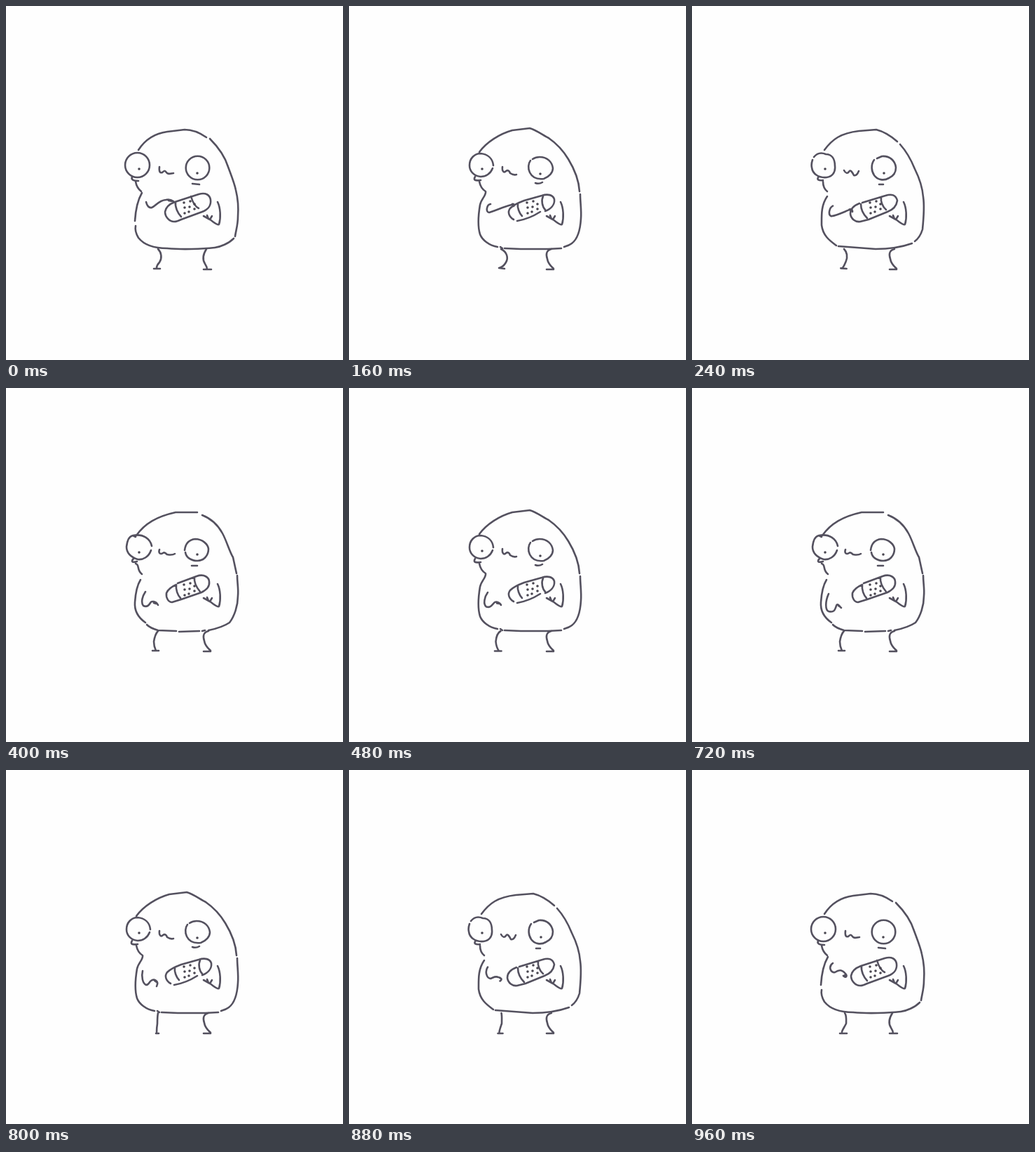
An HTML page that plays this animation: 481 px wide and 504 px high, repeating every 1.04 s.

```html
<!DOCTYPE html>
<html lang="en">
<head>
<meta charset="utf-8">
<title>Bandage buddy</title>
<style>
  html, body { margin: 0; width: 100%; height: 100%; overflow: hidden; background: #fefefe; }
  svg { display: block; width: 100%; height: 100%; }
  path, circle, use { fill: none; stroke: #54515f; stroke-width: 2.6; stroke-linecap: round; stroke-linejoin: round; }
  .dots, .pupils { stroke: #48454f; stroke-width: 3.6; }
  .pose { opacity: 0; animation: 1040ms step-end infinite; }

  /* four line drawings take turns, one every 80 ms */
  #p1 { animation-name: first; }
  #p2 { animation-name: second; }
  #p3 { animation-name: third; }
  #p4 { animation-name: fourth; }
  @keyframes first {
    0%, 30.769%, 61.538%, 92.307% { opacity: 1; }
    7.692%, 38.461%, 69.23% { opacity: 0; }
  }
  @keyframes second {
    7.692%, 38.461%, 69.23% { opacity: 1; }
    0%, 15.384%, 46.153%, 76.923% { opacity: 0; }
  }
  @keyframes third {
    15.384%, 46.153%, 76.923% { opacity: 1; }
    0%, 23.076%, 53.846%, 84.615% { opacity: 0; }
  }
  @keyframes fourth {
    23.076%, 53.846%, 84.615% { opacity: 1; }
    0%, 30.769%, 61.538%, 92.307% { opacity: 0; }
  }

  /* the near arm (with its dark hand) and leg swing between key poses, in 80 ms steps */
  #arm { animation: arm 1040ms infinite; }
  #leg { animation: leg 1040ms infinite; }
  @keyframes arm {
    0% { animation-timing-function: steps(2); d: path("M200 279C201 284 204 288 208 287C214 285 217 277 228 276C232 275 236 276 239 278M232 277L237 278"); }
    15.384% { animation-timing-function: steps(3); d: path("M202 282C196 283 195 294 200 294C210 291 220 286 232 283C234 281 237 282 235 285M233 283L235 284"); }
    38.461% { animation-timing-function: steps(2); d: path("M199 290C195 296 192 305 196 310C200 312 203 311 206 306C207 303 214 303 217 309M211 306L214 307"); }
    53.846% { animation-timing-function: steps(2); d: path("M197 292C192 298 190 311 196 313C202 314 203 310 207 307C210 303 215 306 217 309M211 307L214 307"); }
    69.23% { animation-timing-function: steps(1); d: path("M195 293C190 304 190 316 195 318C203 320 204 316 206 310C208 305 211 312 213 313M209 310L212 312"); }
    76.923% { animation-timing-function: steps(2); d: path("M195 286C193 294 195 304 200 306C204 306 204 302 207 300C211 297 219 300 215 308M212 300L215 302"); }
    92.307%, 100% { animation-timing-function: steps(1); d: path("M201 275C194 280 198 289 204 288C210 284 214 284 219 290C222 293 220 297 216 293M218 292L220 293"); }
  }
  @keyframes leg {
    0% { animation-timing-function: steps(2); d: path("M217 346C222 351 223 359 219 365C216 368 215 370 215 373M211 374L220 374"); }
    15.384% { animation-timing-function: steps(3); d: path("M217 346C225 350 228 358 224 365C221 370 219 371 215 373M214 373L222 374"); }
    38.461% { animation-timing-function: steps(2); d: path("M217 346C213 350 212 355 211 361C211 366 212 370 214 374M209 374L218 374"); }
    53.846% { animation-timing-function: steps(2); d: path("M216 346C209 348 208 356 208 361C209 367 211 372 214 375M207 375L217 375"); }
    69.23% { animation-timing-function: steps(1); d: path("M217 346C213 350 212 355 211 361C211 366 212 370 214 374M209 374L218 374"); }
    76.923% { animation-timing-function: steps(2); d: path("M217 346C216 351 216 357 216 361C215 367 215 370 215 374M214 375L218 375"); }
    92.307%, 100% { animation-timing-function: steps(1); d: path("M218 346C221 350 220 358 220 361C217 367 214 371 214 373M211 375L221 375"); }
  }
</style>
</head>
<body>
<svg viewBox="0 0 481 504" preserveAspectRatio="none">
  <defs>
    <path id="dots" class="dots" d="M254 280h0M263 278h0M269 282h0M255 287h0M262 286h0M255 295h0M261 293h0M269 289h0"/>
    <path id="farArm" d="M302 279C306 287 307 301 304 311C300 312 296 307 291 304M282 299L291 304M287 298L289 303M294 299L291 304"/>
    <path id="farLeg" d="M289 346C281 348 281 354 283 360C284 367 288 370 292 374M282 375L292 375"/>
  </defs>

  <g id="p1" class="pose">
    <path d="M189 205C200 188 215 181 230 179L255 176C266 176 276 180 286 187M291 189C305 203 313 216 317 229C321 240 326 252 328 262C331 274 332 287 331 300C331 312 328 320 327 328M325 331C318 338 306 343 298 344C280 346 250 347 230 345C212 345 197 340 189 330C186 325 184 318 185 313M184 306C185 290 187 278 194 266"/>
    <circle cx="187.5" cy="226.5" r="17.5"/>
    <circle cx="273.5" cy="230.5" r="16.8"/>
    <path class="pupils" d="M190 232h0M273 238h0"/>
    <path d="M180 243C178 248 183 249 189 249M185 250C186 256 188 260 193 264"/>
    <path d="M219 229C218 236 220 238 223 237C226 234 227 234 229 237C231 240 234 239 239 238M266 253L276 254"/>
    <path d="M240 307C233 307 227 300 227 293C228 287 233 282 241 279L275 268C285 265 291 269 292 276C293 284 288 290 280 293L250 304C246 306 243 307 240 307M242 279C241 286 245 295 250 300M264 271C266 278 269 285 275 288"/>
    <use href="#dots"/>
    <use href="#farArm"/>
    <path d="M286 346C281 354 280 361 284 367C286 370 287 372 287 375M282 375L293 375"/>
  </g>

  <g id="p2" class="pose">
    <path d="M186 210C198 193 215 183 242 177L273 177M280 181C293 186 303 196 309 207C315 218 319 233 324 241L329 264M330 267C330 278 332 285 331 296C331 310 326 325 319 334C310 340 299 343 289 345M284 345L280 346M276 346L247 347M243 346L217 345C210 343 205 341 201 337M199 334C189 327 183 318 184 305C185 290 187 281 192 273"/>
    <path d="M207 231C204 240 196 245 188 244C179 241 172 235 172 226C173 217 176 211 181 210C196 207 206 215 208 225M181 210L185 212"/>
    <path d="M255 231C256 222 261 216 270 215C280 215 288 222 289 229C289 239 282 246 273 246C264 246 257 241 256 234"/>
    <path class="pupils" d="M190 234h0M273 237h0"/>
    <path d="M182 243C178 247 180 249 187 247M185 250C191 251 186 259 194 265"/>
    <path d="M219 230C217 236 221 237 224 235C227 233 228 236 230 237C235 238 238 238 241 236M265 253L273 253"/>
    <path d="M237 305C232 305 228 299 229 292C231 287 236 283 243 280M245 278L272 268C283 264 290 270 290 276C291 283 285 288 279 291L250 301L237 305M243 280C242 287 245 295 249 299M269 269C268 277 272 284 277 290"/>
    <use href="#dots"/>
    <use href="#farArm"/>
    <use href="#farLeg"/>
  </g>

  <g id="p3" class="pose">
    <path d="M186 208C196 194 215 182 233 177L258 174C268 177 277 184 285 188C298 197 307 208 313 218C321 231 328 246 329 264M330 268C330 280 332 290 331 303C330 320 326 332 318 338C314 341 310 342 307 343M303 345L284 346L245 346L222 345M219 345L216 343M212 343C200 341 190 333 187 325C183 312 185 295 187 283C189 274 196 270 195 264C190 261 187 255 186 250"/>
    <path d="M205 231C202 239 195 243 188 243C178 242 172 235 172 227C172 217 179 210 188 210C198 211 205 217 206 227"/>
    <path d="M259 220C256 224 255 231 258 237C262 245 270 247 278 246C286 243 291 237 291 231C290 222 283 215 272 215C268 215 265 216 262 218"/>
    <path class="pupils" d="M190 232h0M273 239h0"/>
    <path d="M180 243C177 248 180 249 188 248"/>
    <path d="M219 229C218 236 222 238 224 235C227 233 229 235 230 238C233 240 236 241 239 240M266 252Q271 254 276 251"/>
    <path d="M235 304C228 300 226 293 230 288C235 283 242 280 250 277L275 270C284 267 291 269 293 275C294 283 288 289 280 292M240 306C252 304 262 300 273 293M241 281C240 287 243 295 247 299M277 271C274 277 276 286 280 290"/>
    <use href="#dots"/>
    <use href="#farArm"/>
    <use href="#farLeg"/>
  </g>

  <g id="p4" class="pose">
    <path d="M189 205C200 190 212 181 238 178L263 176C275 179 285 186 293 193M297 197C306 207 314 222 318 232C325 246 329 259 330 272C332 285 331 298 329 318C326 328 322 332 318 335M314 338C300 343 285 346 262 346L209 342M206 341C198 335 187 328 185 312C185 298 184 284 193 271"/>
    <path d="M174 215C178 210 184 208 191 211C199 211 204 217 204 228C205 237 200 243 192 244C181 245 172 239 171 230C170 226 171 222 172 219"/>
    <path d="M260 219C255 226 256 235 260 241C265 248 274 249 281 245C288 242 291 236 291 230C290 220 282 213 271 214L264 217"/>
    <path class="pupils" d="M190 232h0M274 238h0"/>
    <path d="M181 243C177 247 181 249 187 248M187 250C187 256 188 260 193 264"/>
    <path d="M217 234C219 238 222 239 224 236C226 232 229 237 231 241C234 242 236 240 238 235M267 254L273 254"/>
    <path d="M239 281C231 284 226 289 226 296C227 303 233 308 240 307L252 304L279 293C287 290 292 284 293 277C291 269 285 267 276 270L243 280M241 282C241 289 245 297 250 302M270 272C269 278 272 286 277 290"/>
    <use href="#dots"/>
    <use href="#farArm"/>
    <use href="#farLeg"/>
  </g>

  <path id="arm"/>
  <path id="leg"/>
</svg>
</body>
</html>
```
